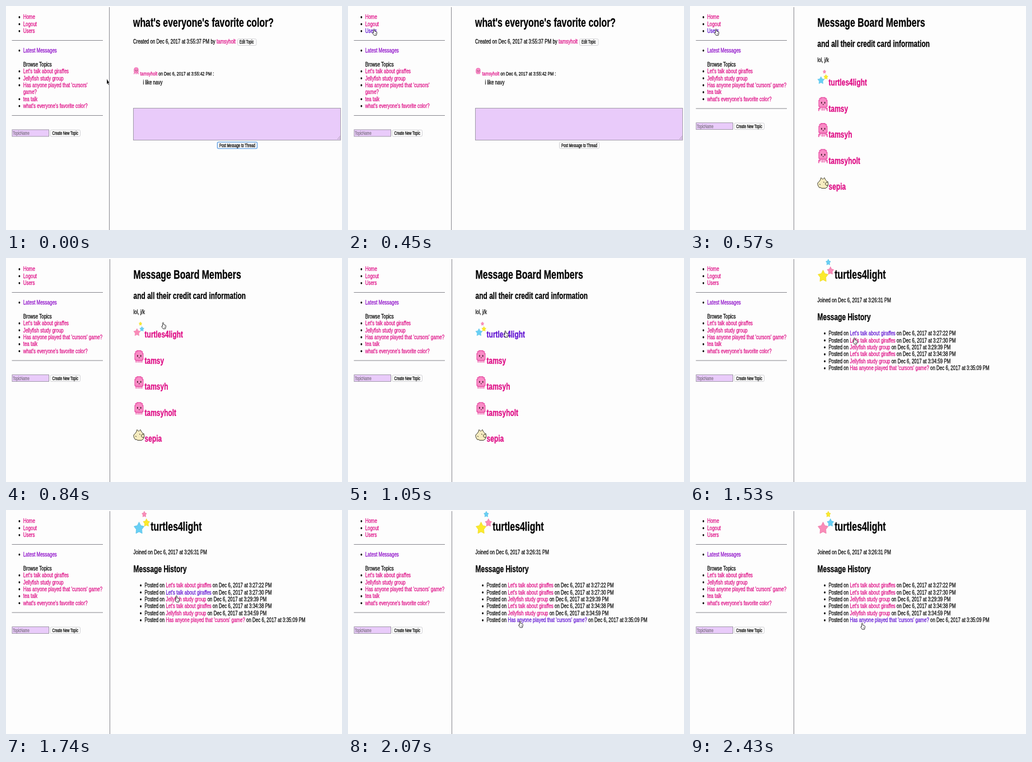
An HTML page for the animation above (2460 ms loop, 600 px wide and 400 px high).

```html
<!DOCTYPE html>
<html lang="en">
<head>
<meta charset="utf-8">
<title>Message board</title>
<style>
  html, body { margin: 0; height: 100%; overflow: hidden; background: #fdfdfd; }
  svg { display: block; width: 100vw; height: 100vh; }
  text { font-family: "Liberation Sans", Arial, sans-serif; }
  text, tspan { fill: currentColor; stroke: currentColor; stroke-width: .4; }
  .link { color: #de0a84; }
  .visited { color: #8c0ac8; }
  .link.hover { color: #5f10d2; }
  .field { fill: #e9cbfa; stroke: #a09aa8; }
  .button { fill: #fefefe; stroke: #d0d0d4; }
  .focus .button { stroke: #72a9e4; stroke-width: 1.6; }
  .rule { stroke: #85858c; }
</style>
</head>
<body>
<svg id="stage" viewBox="0 0 600 400"></svg>
<script>
const LOOP = 2460, MEMBERS_AT = 540, PROFILE_AT = 1170, TICK = 160;
const SX = .498, SY = .69;   // the page is shown at this scale

// [square brackets] mark links
const text = (x, y, content, size = 16, weight = 400, color = '#000') =>
  `<text transform="translate(${x} ${y}) scale(${SX} ${SY})" font-size="${size}" font-weight="${weight}" color="${color}">` +
  content.replace(/\[(.*?)\]/g, '<tspan class="link">$1</tspan>') + '</text>';
const bullet = (x, y) => `<ellipse cx="${x - 6.8}" cy="${y - 3.4}" rx="1.4" ry="1.9"/>`;
const item = (x, y, content) => bullet(x, y) + text(x, y, content);
const rule = (x1, y1, x2, y2) => `<path class="rule" d="M${x1} ${y1}L${x2} ${y2}"/>`;
const box = (type, x, y, w, h, r = 0) =>
  `<rect class="${type}" x="${x}" y="${y}" width="${w}" height="${h}" rx="${r}"/>`;
const button = (x, y, w, label) =>
  box('button', x, y, w, 11.5, 2) + text(x + 3.6, y + 8.6, label, 11.8);

// two swimming poses: legs spread, legs tucked
const jelly = (x, y, size) => {
  const pose = (name, dy, legs) => `<g class="${name}" transform="translate(0 ${dy})">
    <path d="${legs}" fill="none" stroke="#ee62ae" stroke-width="1.5"/>
    <path d="M5 .5h6v1h2v2h1v6h-1v1H3v-1H2v-6h1v-2h2z" fill="#f98cc6" stroke="#e850a4" stroke-width=".9"/>
    <path d="M5.2 5h1.4v1.8H5.2zM9.9 5h1.4v1.8H9.9zM7.6 7.4h1.4v.8H7.6z" fill="#47232f"/></g>`;
  return `<g transform="translate(${x} ${y}) scale(${size * SX / 16} ${size * SY / 16})">` +
    pose('spread', 0, 'M4 10v2H2v2.5M6.8 11v3M9.5 11v3M12 10v2h2v2.5') +
    pose('tucked', 1.2, 'M4 10v2.8M6.7 10v2.8M9.4 10v2.8M12 10v2.8') + '</g>';
};

function star(cx, cy, rx, ry) {
  const points = Array.from({length: 10}, (_, i) => {
    const a = i * Math.PI / 5, r = i % 2 ? .55 : 1;
    return (cx + rx * r * Math.sin(a)).toFixed(2) + ',' + (cy - ry * r * Math.cos(a)).toFixed(2);
  });
  return `<polygon class="star" points="${points.join(' ')}" stroke-linejoin="round"/>`;
}
const stars = (x, y, sx, sy) => `<g transform="translate(${x} ${y}) scale(${sx} ${sy})">` +
  star(6.4, 15.6, 6.3, 7) + star(12.6, 0, 2.9, 3.4) + star(15.2, 9.5, 4, 4.6) + '</g>';

const puppy = `<g stroke="#3c3a2c" stroke-width="1">
  <path d="M228 316l3-3 2-3 1-3.5 3 3 3-3 2 4 4 4 1 4-2 5-3 2h-7l-2-1.5-2 .5-2-3-1-3z" fill="#f6ecc0"/>
  <path d="M247 314l-4 1-1.500 3 2 2.500 3-.5M238 314l2 1.500M231 318l2 1" fill="none"/></g>`;

function sidebar(lineX, wrapped) {
  const lines = ["[Let's talk about giraffes]", '[Jellyfish study group]',
    ...(wrapped ? ["[Has anyone played that 'cursors']", 'game?'] : ["[Has anyone played that 'cursors' game?]"]),
    '[tea talk]', "[what's everyone's favorite color?]"];
  const drop = wrapped ? 12.4 : 0;
  return ['Home', 'Logout', 'Users'].map((s, i) => item(30.7, 23.4 + i * 12.4, `[${s}]`)).join('') +
    rule(10.5, 61.5, 173, 61.5) +
    item(30.7, 83, '<tspan class="visited">Latest Messages</tspan>') +
    text(30.7, 107.7, 'Browse Topics') +
    lines.map((s, i) => s === 'game?' ? text(30.7, 120.1 + i * 12.4, '[game?]') : item(30.7, 120.1 + i * 12.4, s)).join('') +
    rule(10.5, 183.1 + drop, 173, 183.1 + drop) +
    box('field', 11, 208.5 + drop, 65.5, 12) +
    text(12.3, 217.8 + drop, 'TopicName', 11.8, 400, '#85788c') +
    button(79, 209 + drop, 53.5, 'Create New Topic') +
    rule(lineX, 2, lineX, 400);
}

const thread = sidebar(184.6, true) +
  text(227, 37, "what's everyone's favorite color?", 32, 700) +
  text(227, 67.2, 'Created on Dec 6, 2017 at 3:55:37 PM by [tamsyholt]') +
  button(413.5, 58.8, 33.5, 'Edit Topic') +
  jelly(227.5, 109.6, 20) +
  text(239.5, 124, '[tamsyholt] on Dec 6, 2017 at 3:55:42 PM :', 14.4) +
  text(244.5, 140.3, 'i like navy') +
  box('field', 227.5, 182.5, 370, 57) +
  '<path d="M592 238l5-6M595 238l2-3" stroke="#8d858d" stroke-width=".6"/>' +
  `<g id="post">${button(377.5, 243, 71, 'Post Message to Thread')}</g>`;

const members = sidebar(185.5) +
  text(227.6, 37, 'Message Board Members', 32, 700) +
  text(227.6, 72.8, 'and all their credit card information', 24, 700) +
  text(227.6, 100.2, 'lol, j/k') +
  stars(227.5, 117.4, 1, 1) + [162.6, 209, 255.4].map(y => jelly(227.5, y, 40)).join('') + puppy +
  ['turtles4light', 'tamsy', 'tamsyh', 'tamsyholt', 'sepia']
    .map((s, i) => text(247.6, 142.4 + i * 46.4, `[${s}]`, 24, 700)).join('');

const giraffes = "Let's talk about giraffes", jellyfish = 'Jellyfish study group';
const posts = [[giraffes, '27:22'], [giraffes, '27:30'], [jellyfish, '29:39'], [giraffes, '34:38'],
  [jellyfish, '34:59'], ["Has anyone played that 'cursors' game?", '35:09']];
const profile = sidebar(185.5) + stars(228, 7.8, 1.5, 1.6) +
  text(258.3, 37, 'turtles4light', 32, 700) +
  text(227.6, 79.4, 'Joined on Dec 6, 2017 at 3:26:31 PM') +
  text(227.6, 110.8, 'Message History', 24, 700) +
  posts.map(([topic, time], i) =>
    item(247.4, 138.1 + i * 12.44, `Posted on [${topic}] on Dec 6, 2017 at 3:${time} PM`)).join('');

const cursors = {
  arrow: '<path d="M0 0v9.6l1.5-1.7 1.3 3.2 1.2-.6-1.3-3H4.8z" fill="#000" stroke="#fff" stroke-width=".4"/>',
  hand: '<path d="M-1 .8Q0-.8 1 .8V4l3.4 1Q5.4 5.500 5 8L4 11.500H0L-2.6 7.600Q-2.800 6-1 7z" fill="#fff" stroke="#222" stroke-width=".9"/><path d="M1.6 7.500v2.500M3.100 7.500v2.500" stroke="#444" stroke-width=".5"/>',
  beam: '<path d="M-1.6-4.6Q0-4.6 0-3.4V4Q0 5-1.6 5M1.6-4.6Q0-4.6 0-3.4V4Q0 5 1.6 5" fill="none" stroke="#555" stroke-width=".7"/>'
};

const group = (id, content) => `<g id="${id}">${content}</g>`;
const stage = document.getElementById('stage');
stage.innerHTML = group('thread', thread) + group('members', members) + group('profile', profile) +
  group('cursor', Object.entries(cursors).map(([id, shape]) => group(id, shape)).join(''));

const $ = id => document.getElementById(id);
const show = (node, on) => { node.style.display = on ? '' : 'none'; };
const links = Object.fromEntries(['thread', 'members', 'profile'].map(id => [id, [...$(id).querySelectorAll('.link')]]));
const USERS = 2;
const firstMember = links.members.findIndex(l => l.textContent === 'turtles4light');
const firstPost = links.profile.length - posts.length;

// time, x, y of the pointer
const path = [[0, 180, 130], [60, 180, 130], [390, 46.5, 41], [600, 46.5, 41], [820, 280.5, 115],
  [850, 280.5, 115], [960, 281, 130], [1400, 281, 130], [1650, 304.5, 153], [1760, 304.5, 153],
  [2130, 307.5, 201.7], [LOOP, 307.5, 201.7]];
function pointer(t) {
  const i = path.findIndex(p => p[0] > t);
  const [t0, x0, y0] = path[i - 1], [t1, x1, y1] = path[i];
  const u = (t - t0) / (t1 - t0), k = u * u * (3 - 2 * u);
  return [x0 + (x1 - x0) * k, y0 + (y1 - y0) * k];
}

const palette = ['#68cff4', '#f98cb8', '#fbea2c'], outline = ['#52bfe6', '#ec72a4', '#ecd824'];
function paintStars(page, step) {
  page.querySelectorAll('.star').forEach((s, i) => {
    const c = (step + i) % 3;
    s.setAttribute('fill', palette[c]);
    s.setAttribute('stroke', outline[c]);
    s.setAttribute('stroke-width', .5);
  });
}

function draw(t) {
  const page = t < MEMBERS_AT ? 'thread' : t < PROFILE_AT ? 'members' : 'profile';
  const start = {thread: -60, members: MEMBERS_AT, profile: PROFILE_AT}[page];
  const step = Math.floor((t - start) / TICK);
  const [x, y] = pointer(t);

  let hover = -1;
  if (t > 370 && t < 640) hover = USERS;
  else if (page === 'members' && t > 880) hover = firstMember;
  else if (page === 'profile' && x > 285) {
    const row = Math.round((y - 139.8) / 12.44);
    if (row >= 0 && row < posts.length) hover = firstPost + row;
  }
  const kind = hover >= 0 || (t > 800 && t < PROFILE_AT) ? 'hand' : page === 'profile' ? 'beam' : 'arrow';

  for (const id in links) {
    show($(id), id === page);
    links[id].forEach((l, i) => l.classList.toggle('hover', id === page && i === hover));
  }
  for (const id in cursors) show($(id), id === kind);
  $('post').classList.toggle('focus', t < 420);
  $('cursor').setAttribute('transform', `translate(${x} ${y})`);
  $(page).querySelectorAll('.spread').forEach(pose => show(pose, step % 2 === 0));
  $(page).querySelectorAll('.tucked').forEach(pose => show(pose, step % 2 === 1));
  paintStars($(page), step);
}

function frame() {
  draw(performance.now() % LOOP);
  requestAnimationFrame(frame);
}
frame();
</script>
</body>
</html>
```
